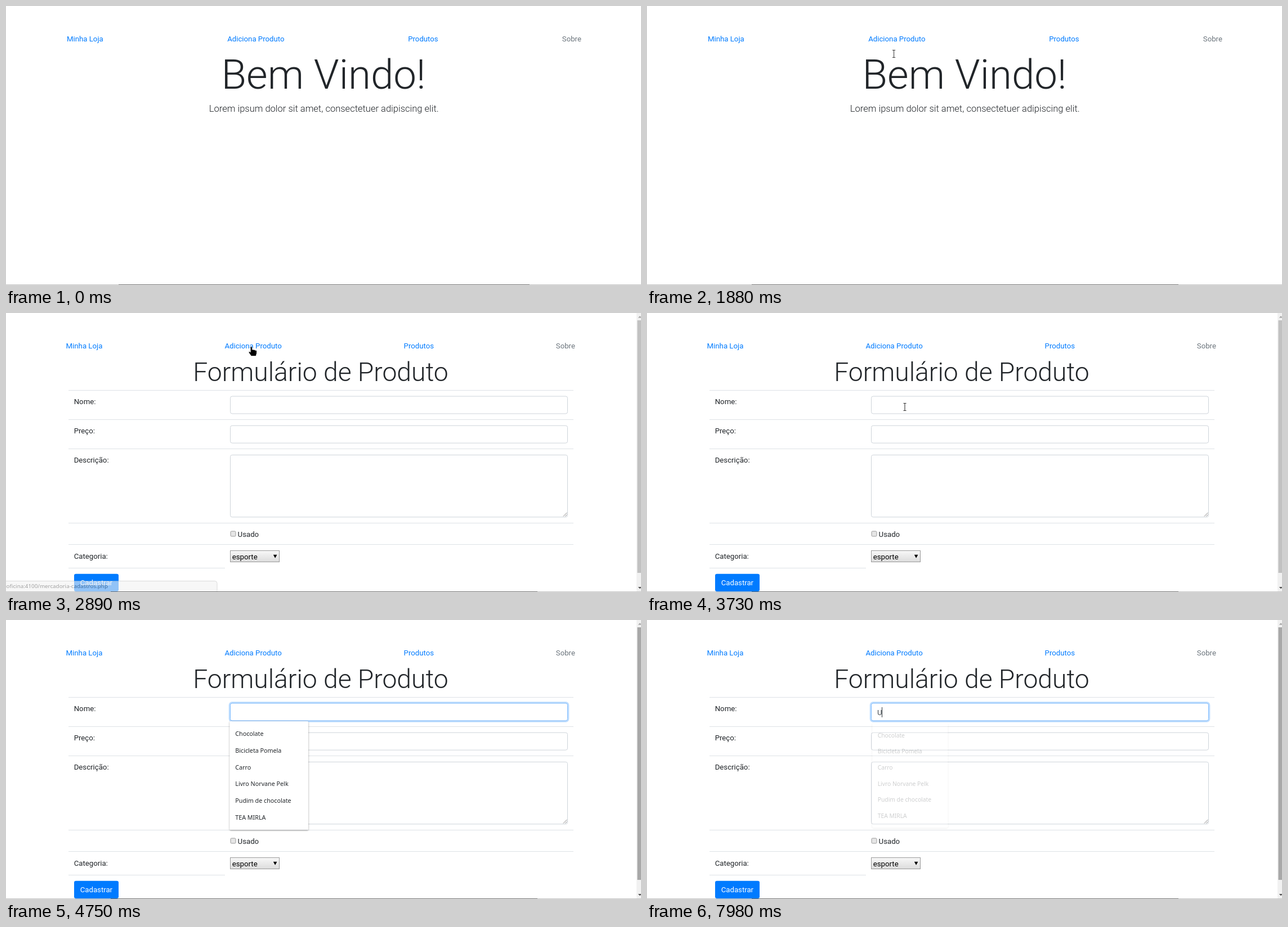
Animation of 1128 by 496 pixels, one loop 8 s. Source, as an HTML page:

```html
<!DOCTYPE html>
<html lang="pt-BR">
<head>
<meta charset="utf-8">
<title>Formulário de Produto</title>
<style>
html, body { margin: 0; width: 100%; height: 100%; overflow: hidden; background: #fff; }
svg { display: block; width: 1128px; height: 496px; font: 13.21px Roboto, sans-serif; fill: #212529; }
svg * { animation-duration: 8s; animation-iteration-count: infinite; animation-timing-function: linear; }
.hard, .hard > * { animation-timing-function: step-end; }
.light { font-weight: 300; text-anchor: middle; }
.nav { fill: #007bff; }
.off { fill: #6c757d; }
.rules { stroke: #dee2e6; fill: none; }
.box { fill: #fff; stroke: #ced4da; }
.noto { font-family: "Noto Sans", sans-serif; }

.home { animation-name: home; }
.form { animation-name: form; }
@keyframes home { 0% { opacity: 1 } 33.75%, 100% { opacity: 0 } }
@keyframes form { 0% { opacity: 0 } 33.75%, 100% { opacity: 1 } }

/* link hover */
.list { animation-name: list; }
.add { animation-name: add; }
@keyframes list {
  0%, 5%, 100% { fill: #007bff; text-decoration: none }
  1.7% { fill: #0056b3; text-decoration: underline }
}
@keyframes add {
  0%, 12.6%, 33.75%, 43.4%, 100% { fill: #007bff; text-decoration: none }
  11.4%, 24.8%, 42.125% { fill: #0056b3; text-decoration: underline }
}

.status { animation-name: status; }
@keyframes status {
  0%, 4%, 19.5%, 28.1%, 38.5%, 100% { opacity: 0 }
  6%, 14.1%, 31.2%, 34.6% { opacity: 1 }
}
.bar { transform-origin: 565px 0; animation-name: bar; }
@keyframes bar { 0%, 4% { transform: none } 9%, 100% { transform: scaleX(1.0384) } }

.thumb { animation-name: thumb; }
@keyframes thumb { 0% { fill: #c1c1c1 } 58.4%, 100% { fill: #a8a8a8 } }
.focus { animation-name: focus; }
@keyframes focus { 0%, 52.6% { opacity: 0 } 54.5%, 100% { opacity: 1 } }
.menu { transform-origin: 467.5px 276.5px; animation-name: menu; }
@keyframes menu {
  0%, 54.3% { opacity: 0; transform: scale(.95) }
  56.4%, 98.2% { opacity: 1; transform: none }
  99.75% { opacity: .22; transform: scale(.96) }
  100% { opacity: .1; transform: scale(.955) }
}
.typed { animation-name: typed; }
@keyframes typed { 0% { opacity: 0 } 97.75%, 100% { opacity: 1 } }
.caret { animation-name: caret; }
@keyframes caret {
  0%, 59.375%, 73.75%, 88.75% { opacity: 0; transform: none }
  52.625%, 65.875%, 81.625%, 96.25% { opacity: 1; transform: none }
  97.75%, 100% { opacity: 1; transform: translateX(8px) }
}

/* pointer */
.pointer { animation-name: move; }
@keyframes move {
  0%, .5% { transform: translate(556px, 2px) }
  1.25% { transform: translate(650px, 40px) }
  1.875%, 4% { transform: translate(742px, 76px) }
  6% { transform: translate(735px, 30px) }
  7.5% { transform: translate(640px, 6px) }
  10% { transform: translate(520px, 14px) }
  11.9% { transform: translate(447px, 55px) }
  13.625% { transform: translate(437px, 90px) }
  21.25% { transform: translate(438px, 90px) }
  21.375%, 23.4% { transform: translate(438.5px, 86px) }
  23.5%, 24% { transform: translate(438.5px, 85px) }
  26.25%, 42.125% { transform: translate(436px, 60px) }
  43.1% { transform: translate(438px, 72px) }
  44.5% { transform: translate(446px, 120px) }
  46.625%, 47.1% { transform: translate(458px, 167px) }
  48.2% { transform: translate(461px, 199px) }
  49.5% { transform: translate(459px, 196px) }
  51.25%, 55% { transform: translate(456px, 166px) }
  56.8% { transform: translate(760px, 150px) }
  58.6%, 100% { transform: translate(1124px, 135px) }
}
.arrow { animation-name: arrow; }
.hand { animation-name: hand; }
.beam { animation-name: beam; }
@keyframes arrow {
  0%, 1.7%, 11.4%, 58.9%, 100% { opacity: 0 }
  .5%, 5%, 58% { opacity: 1 }
}
@keyframes hand {
  0%, 5%, 12.6%, 43.4%, 100% { opacity: 0 }
  1.7%, 11.4%, 24.8% { opacity: 1 }
}
@keyframes beam {
  0%, 24.8%, 58%, 100% { opacity: 0 }
  12.6%, 43.4% { opacity: 1 }
}
</style>
</head>
<body>
<svg viewBox="0 0 1128 496">
  <defs>
    <linearGradient id="face" x2="0" y2="1">
      <stop stop-color="#f8f8f8"/><stop offset="1" stop-color="#dcdcdc"/>
    </linearGradient>
    <filter id="shade" x="-10%" y="-10%" width="120%" height="120%">
      <feDropShadow dx="0" dy="1" stdDeviation="1.5" flood-opacity=".4"/>
    </filter>
  </defs>

  <g class="home hard">
    <g class="nav hard">
      <text x="108" y="63">Minha Loja</text>
      <text class="add" x="393.2" y="63">Adiciona Produto</text>
      <text class="list" x="714.2" y="63">Produtos</text>
      <text class="off" x="987.8" y="63">Sobre</text>
    </g>
    <text class="light" x="564" y="146.7" font-size="72.67">Bem Vindo!</text>
    <text class="light" x="564.8" y="187.5" font-size="16.52">Lorem ipsum dolor sit amet, consectetuer adipiscing elit.</text>
  </g>

  <g class="form hard">
    <g class="nav hard">
      <text x="106.6" y="63">Minha Loja</text>
      <text class="add" x="388.4" y="63">Adiciona Produto</text>
      <text x="706.6" y="63">Produtos</text>
      <text class="off" x="976.8" y="63">Sobre</text>
    </g>
    <text class="light" x="559" y="121" font-size="46.24">Formulário de Produto</text>
    <path class="rules" d="M111 137.5H1008M111 189.5H1008M111 241.5H1008M111 373.5H1008M111 411.5H1008M111 453.5H389"/>
    <text x="120.7" y="161.8">Nome:</text>
    <text x="120.7" y="214">Preço:</text>
    <text x="120.7" y="266.2">Descrição:</text>
    <text x="120.7" y="436.5">Categoria:</text>

    <g class="box">
      <rect x="398.5" y="148" width="599" height="31" rx="3.3"/>
      <rect x="398.5" y="200.2" width="599" height="31" rx="3.3"/>
      <rect x="398.5" y="252.4" width="599" height="110.4" rx="3.3"/>
    </g>
    <path d="M990 361.5l6.5-6.5M993.5 361.5l3-3" stroke="#777" stroke-width=".9"/>
    <rect x="399" y="388" width="9" height="9" rx="1.5" fill="#e6e6e6" stroke="#999"/>
    <text x="411.6" y="398">Usado</text>
    <rect x="398.5" y="422.5" width="87" height="20" fill="url(#face)" stroke="#9a9a9a"/>
    <text x="401.8" y="437.8" fill="#000">esporte</text>
    <path d="M474.8 429.8h6.6l-3.3 6z" fill="#000"/>
    <rect x="121" y="463.7" width="79" height="31.4" rx="3.3" fill="#007bff"/>
    <text x="160.4" y="484.4" fill="#fff" text-anchor="middle">Cadastrar</text>

    <rect x="1120" width="8" height="496" fill="#f1f1f1"/>
    <g class="hard"><rect class="thumb" x="1121.5" y="13" width="6.5" height="449"/></g>
    <path d="M1122.8 8.5l3.2-3.3 3.2 3.3z" fill="#a3a3a3"/>
    <path d="M1122.8 487l3.2 3.3 3.2-3.3z" fill="#505050"/>

    <g class="focus">
      <rect x="397" y="146.7" width="602" height="33.6" rx="4.5" fill="none" stroke="#007bff" stroke-opacity=".25" stroke-width="2.7"/>
      <rect x="398.5" y="148" width="599" height="31" rx="3.3" fill="#fff" stroke="#80bdff"/>
    </g>
    <g class="hard">
      <text class="typed" x="409" y="168.5" fill="#495057">U</text>
      <rect class="caret" x="409" y="155" width="1" height="18" fill="#30363b"/>
    </g>
    <g class="menu noto" font-size="10.73">
      <rect x="397.5" y="180" width="139.5" height="193" rx="1.5" fill="#fff" filter="url(#shade)"/>
      <text x="407.3" y="205.8">Chocolate</text>
      <text x="407.3" y="235.7">Bicicleta Pomela</text>
      <text x="407.3" y="265.5">Carro</text>
      <text x="407.3" y="295.4">Livro Norvane Pelk</text>
      <text x="407.3" y="325.2">Pudim de chocolate</text>
      <text x="407.3" y="355.1">TEA MIRLA</text>
    </g>
  </g>

  <g class="status noto">
    <path d="M-1 476.5H371q4 0 4 4V497H-1z" fill="#f2f2f2" stroke="#c4c4c4"/>
    <text x=".6" y="489.3" font-size="9.8" fill="#666">oficina:4100/mercadoria-cadastros.php</text>
  </g>

  <rect y="495" width="1128" height="1" fill="#c4c4c4"/>
  <rect class="bar" x="200" y="495" width="730" height="1" fill="#707070"/>

  <g class="pointer">
    <g class="hard">
      <path class="arrow" d="M0 0V14L3.2 11 5.5 16 7.8 15 5.6 10.2H10z" fill="#000" stroke="#fff" stroke-width=".8"/>
      <path class="hand" d="M-1.8 .8Q-.2-1.4 1.4 .8V5.2Q2.8 4.2 4 5.6 5.6 4.8 6.6 6.2 8.6 5.8 9.4 7.6V11.5L8 16.5H-.4L-4.6 10.6Q-5.4 8.4-3.4 8.4L-1.8 9.8z" fill="#000" stroke="#fff" stroke-width=".7"/>
      <g class="beam" fill="none">
        <path d="M-2.5-6.5H2.5M0-6.5V6.5M-2.5 6.5H2.5" stroke="#fff" stroke-width="2.4"/>
        <path d="M-2.5-6.5H2.5M0-6.5V6.5M-2.5 6.5H2.5" stroke="#333" stroke-width="1.1"/>
      </g>
    </g>
  </g>
</svg>
</body>
</html>
```
